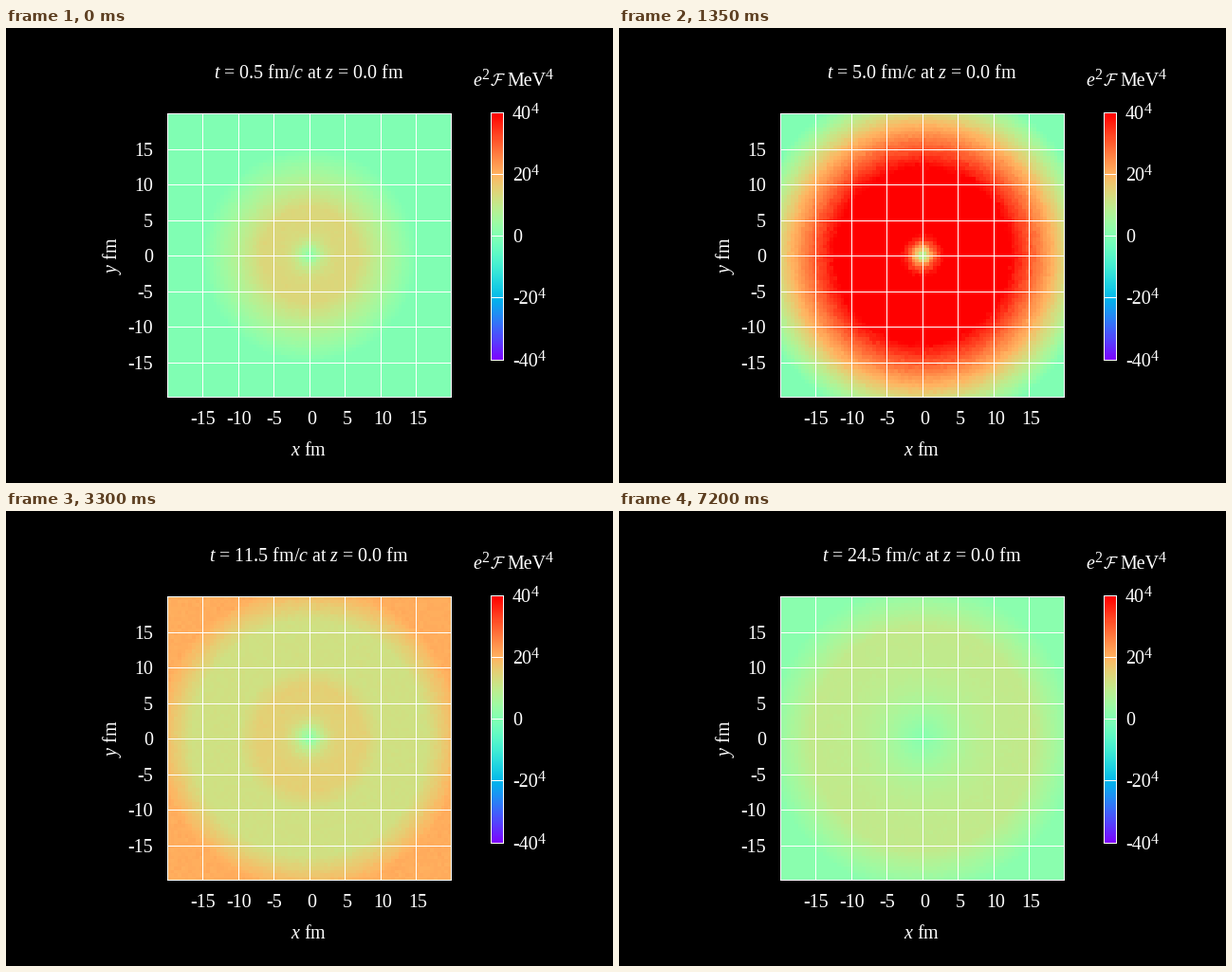
Write a matplotlib script that moves like this. It is 640 by 480 pixels and loops after 7.35 s.

```python
import numpy as np
import matplotlib.pyplot as plt
from matplotlib.animation import FuncAnimation

W, H, DPI = 640, 480, 100
FRAMES, STEP_MS = 49, 150
PX = 72 / DPI
CELLS = 80

plt.rcParams.update({
    "font.family": "Liberation Serif",
    "font.size": 20 * PX,
    "mathtext.fontset": "custom",
    "mathtext.rm": "Liberation Serif",
    "mathtext.it": "Liberation Serif:italic",
    "toolbar": "None",
})

axis = (np.arange(CELLS) + 0.5) * 40 / CELLS - 20
rng = np.random.default_rng(4)
radius = np.hypot(*np.meshgrid(axis, axis))
radius = np.abs(radius + 0.08 * rng.standard_normal(radius.shape))
grain = 1 + 0.012 * rng.standard_normal(radius.shape)


def ramp(x, a, b):
    """Rise linearly from 0 at a to 1 at b."""
    return np.clip((x - a) / (b - a), 0, 1)


def field(t):
    r = radius
    # Strength: quick rise, short peak near t = 4, slow decay
    level = 0.5 * np.exp(-0.155 * (t - 8.5)) * (1 - np.exp(-t / 2.2))
    level += 0.4 * np.exp(-((t - 4) / 1.8) ** 2)

    # Outer front spreading over the plane
    edge = 6.6 + 0.19 * t ** 2
    front = 1 - ramp(r, edge, edge + min(7.5 + 2 * t, 13))

    # Crest running outwards, which leaves a dip behind it
    crest = 0.03 * max(t - 4.5, 0) * ramp(r, 2 * t - 6.5, 2 * t - 1.5)

    # Second, slower pulse
    edge = 7 + 0.032 * max(t - 8, 0) ** 2
    width = np.clip(1.5 + 0.4 * (t - 8.5), 1.5, 6)
    pulse = 0.08 * ramp(t, 4.5, 8) + 0.14 * ramp(t, 11.5, 19.5)
    pulse = pulse * (1 - ramp(r, edge, edge + width))

    # Weak core that widens late
    size = 1.7 + 3.7 * (t / 24.5) ** 4
    core = 1 - 0.85 * np.exp(-(r / size) ** 1.5)
    return core * ((level + crest) * front + pulse) * grain


def title(t):
    return rf"$\mathit{{t}}$ = {t:.1f} fm/$\mathit{{c}}$ at $\mathit{{z}}$ = 0.0 fm"


fig = plt.figure(figsize=(W / DPI, H / DPI), dpi=DPI, facecolor="black")
ax = fig.add_axes([0, 0, 1, 1])
ax.axis("off")


def show(data, extent):
    return ax.imshow(data, cmap="rainbow", vmin=-1, vmax=1, extent=extent,
                     aspect="auto", interpolation="nearest")


def line(xs, ys):
    ax.plot(np.add(xs, 0.5), np.add(ys, 0.5), color="white", lw=PX,
            solid_capstyle="projecting", snap=False, zorder=3)


def frame(x0, y0, x1, y1):
    line([x0, x1, x1, x0, x0], [y0, y0, y1, y1, y0])


def label(x, y, s, size=20, **kw):
    return ax.text(x, y, s, color="white", fontsize=size * PX,
                   va=kw.pop("va", "baseline"), **kw)


heat = show(field(0.5), (170, 470, 390, 90))
show(np.linspace(1, -1, 256)[:, None], (512, 525, 351, 90))

# Grid and axis numbers
for v in range(-15, 16, 5):
    gx, gy = int(320 + 7.5 * v), int(240.5 - 7.5 * v)
    line([gx, gx], [90, 389])
    line([170, 469], [gy, gy])
    label(gx + (0.5 if v < 0 else 2.5), 418, str(v), ha="center")
    label(155, gy + 7, str(v), ha="right")
frame(170, 90, 469, 389)

# Colour bar
frame(511, 89, 524, 350)
for k, v in enumerate((40, 20, 0, -20, -40)):
    y = int(89 + 65.3 * k)
    line([511, 524], [y, y])
    label(534, y + 7, str(v))
    if v:
        label(554 if v > 0 else 561, y + 1, "4", 16)

# Colour bar heading
label(492, 61, "e", style="italic")
label(501, 54, "2", 16)
label(510, 61, r"$\mathcal{F}$", 18, math_fontfamily="cm")
label(528, 61, "MeV")
label(569, 54, "4", 16)

label(319, 451, r"$\mathit{x}$ fm", ha="center")
label(124, 240, r"$\mathit{y}$ fm", rotation=90, ha="right", va="center")
head = label(319, 53, title(0.5), ha="center")

ax.set_xlim(0, W)
ax.set_ylim(H, 0)


def update(i):
    t = 0.5 * (i + 1)
    heat.set_data(field(t))
    head.set_text(title(t))
    return heat, head


anim = FuncAnimation(fig, update, frames=FRAMES, interval=STEP_MS,
                     repeat=True, repeat_delay=0, blit=False)
plt.show()
```
